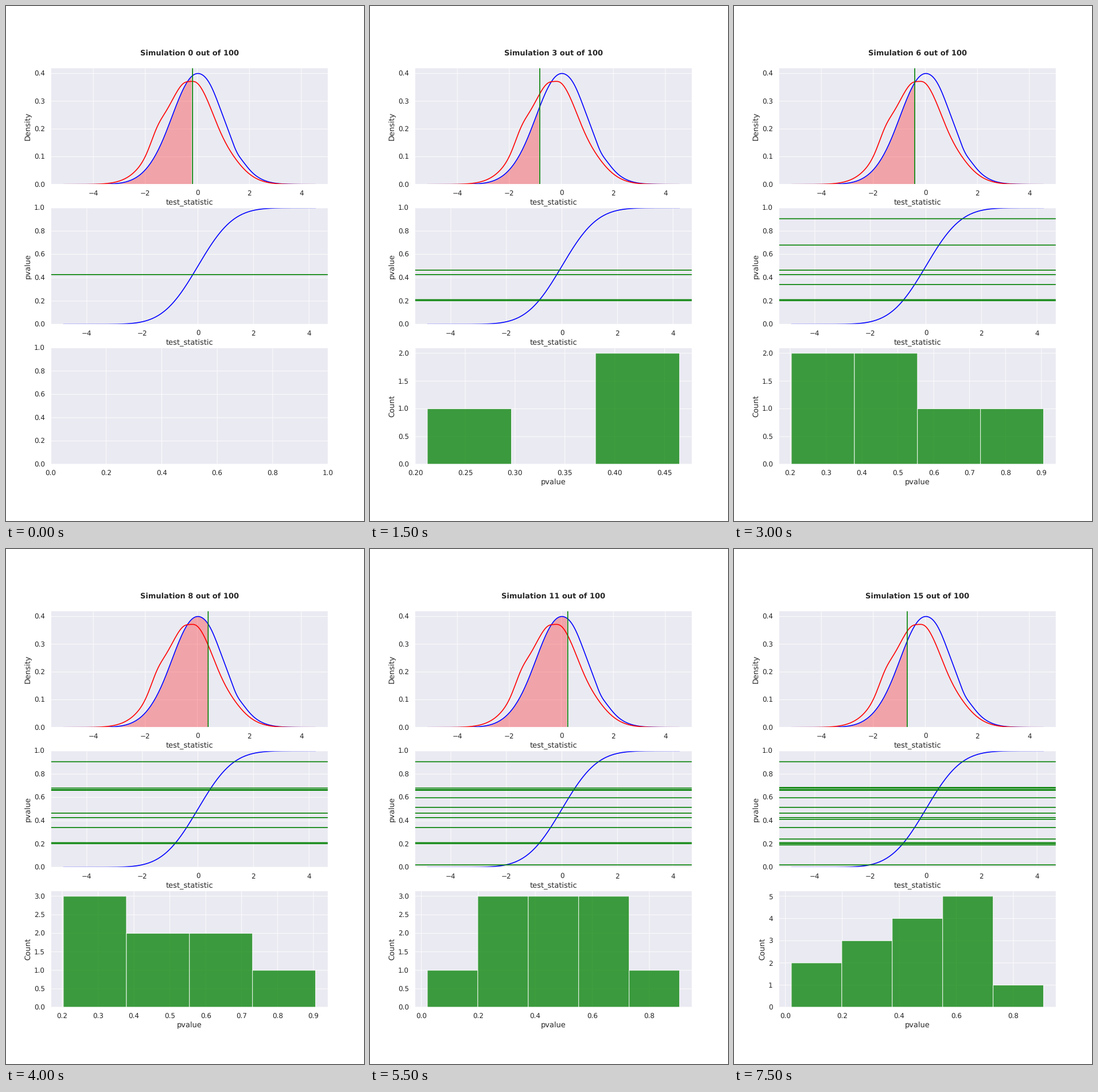
A matplotlib script that plays this animation: 624x897 px, repeating every 8000 ms.

```python
import math

import numpy as np
import matplotlib.pyplot as plt
from matplotlib.animation import FuncAnimation

plt.rcParams.update({
    "font.family": "DejaVu Sans",
    "text.hinting": "none",
    "text.color": ".15",
    "path.snap": False,
    "axes.labelcolor": ".15",
    "axes.facecolor": "#EAEAF2",
    "axes.edgecolor": "white",
    "axes.linewidth": 1.44,
    "axes.axisbelow": True,
    "axes.grid": True,
    "axes.labelsize": 12,
    "axes.titlesize": 12,
    "grid.color": "white",
    "grid.linewidth": 0.8,
    "lines.linewidth": 1.5,
    "lines.solid_capstyle": "round",
    "patch.edgecolor": "w",
    "patch.force_edgecolor": True,
    "patch.linewidth": 0.8,
    "xtick.labelsize": 11,
    "ytick.labelsize": 11,
    "xtick.color": ".15",
    "ytick.color": ".15",
    "xtick.major.size": 6,
    "ytick.major.size": 6,
    "xtick.bottom": False,
    "ytick.left": False,
})

RUNS = 100
# Outcome of each simulated test
P_VALUES = np.array([0.427, 0.465, 0.212, 0.2033, 0.906, 0.68, 0.3415, 0.667,
                     0.661, 0.5145, 0.0213, 0.597, 0.685, 0.412, 0.1925, 0.243])


def bell(x, centre=0.0, width=1.0):
    return np.exp(-0.5 * ((x - centre) / width) ** 2)


def null_density(x):
    """Standard normal with slight sampling ripples."""
    return (bell(x) / math.sqrt(2 * math.pi)
            + 0.007 * bell(x, 0.5, 0.25)
            - 0.010 * bell(x, 1.5, 0.16)
            - 0.005 * bell(x, -1.3, 0.4))


def sample_density(x):
    """Shifted normal with a left shoulder and a flattened top."""
    return (0.38 * bell(x, -0.25, 1.05)
            + 0.030 * bell(x, -1.55, 0.26)
            - 0.023 * bell(x, 0.83, 0.42)
            - 0.008 * bell(x, -0.28, 0.15))


def normal_cdf(x):
    return np.array([0.5 * (1 + math.erf(v / math.sqrt(2))) for v in x])


def label(ax, x, y):
    ax.set_xlabel(x, labelpad=3.3)
    ax.set_ylabel(y)


fig, (ax_density, ax_p, ax_hist) = plt.subplots(3, 1, figsize=(8, 11.5), dpi=78)

# Densities
grid = np.linspace(-5.151, 4.546, 200)
null = null_density(grid)
ax_density.plot(grid, null, color="blue")
ax_density.plot(grid, sample_density(grid), color="red")
ax_density.set(xlim=(-5.636, 5.03), ylim=(0, 0.4204))
label(ax_density, "test_statistic", "Density")
marker = ax_density.axvline(0, color="green")

# Test statistic to p-value
stat = np.linspace(-4.845, 4.238, 400)
cdf = normal_cdf(stat)
stats = np.interp(P_VALUES, cdf, stat)
ax_p.plot(stat, cdf, color="blue")
ax_p.set(xlim=(-5.30, 4.692), ylim=(0, 1))
label(ax_p, "test_statistic", "pvalue")
levels = [ax_p.axhline(p, color="green") for p in P_VALUES]

shade = []


def draw_shade(t):
    while shade:
        shade.pop().remove()
    shade.append(ax_density.fill_between(grid, null, where=grid < t,
                                         facecolor="red", alpha=0.3))


def draw_histogram(values):
    ax_hist.cla()
    if len(values) == 0:
        ax_hist.set(xlim=(0, 1), ylim=(0, 1))
        return
    edges = np.histogram_bin_edges(values, bins="auto")
    counts, _ = np.histogram(values, edges)
    ax_hist.bar(edges[:-1], counts, width=np.diff(edges), align="edge",
                facecolor=(0, 0.5, 0, 0.75), edgecolor="white")
    label(ax_hist, "pvalue", "Count")


def update(run):
    ax_density.set_title(f"Simulation {run} out of {RUNS}",
                         fontweight="bold", pad=19)
    marker.set_xdata([stats[run]] * 2)
    draw_shade(stats[run])
    for i, level in enumerate(levels):
        level.set_visible(i <= run)
    draw_histogram(P_VALUES[:run])
    return []


anim = FuncAnimation(fig, update, frames=len(P_VALUES), interval=500,
                     repeat=True, repeat_delay=0, blit=False)
plt.show()
```
